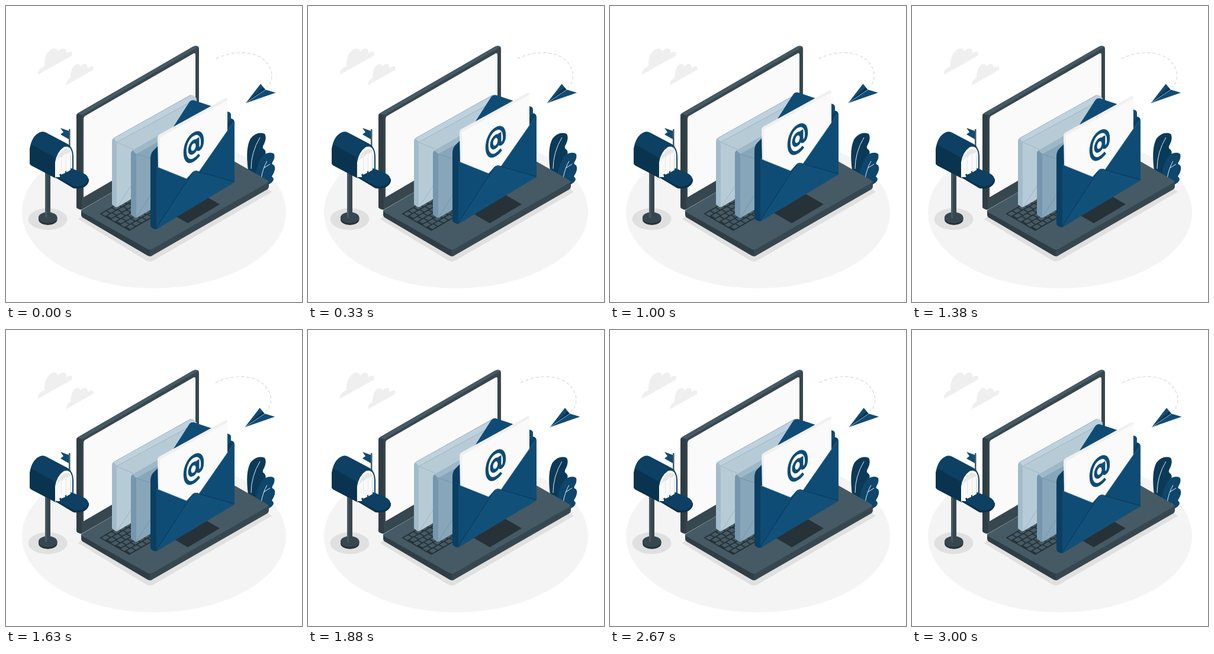
Recreate the animation shown at these times as an HTML page. Size 500 by 500 pixels, loop 3040 ms.

```html
<!DOCTYPE html>
<html lang="en">
<head>
<meta charset="utf-8">
<title>Email</title>
<style>
  html, body { margin: 0; width: 100%; height: 100%; overflow: hidden; background: #fff; }
  svg { display: block; width: 100vw; height: 100vh; }
</style>
</head>
<body>
<svg viewBox="0 0 500 500">
  <ellipse cx="250" cy="348" rx="223" ry="129" fill="#f4f4f4"/>

  <g id="clouds" fill="#efefef">
    <path d="M54 116L111 84Q113 77 109 77Q105 78 102 80Q103 72 97 72Q92 72 88 77Q86 69 77 73Q64 81 65 102Q53 106 54 116Z"/>
    <path d="M101 134L147 108Q149 101 144 102Q140 103 138 105Q138 97 132 98Q128 99 126 102Q123 95 116 100Q109 106 109 121Q101 126 101 134Z"/>
  </g>

  <g id="plant">
    <path d="M409 278Q404 240 413 224Q424 211 437 216Q441 222 436 233Q431 240 437 243Q441 248 435 256L432 288Z" fill="#0b3a59"/>
    <path d="M420 294Q424 262 436 251Q447 245 453 250Q455 256 450 264Q448 267 453 269Q457 276 449 288Q457 294 443 302Z" fill="#0e466c"/>
    <path d="M414 275Q414 247 429 222M431 291Q434 274 441 262M435 274L446 267" fill="none" stroke="#e8eef2" stroke-width="1"/>
  </g>

  <g id="laptop">
    <path d="M122 360L237 430Q243 433 249 430L449 314L430 300L140 345Z" fill="#e0e0e0"/>
    <path d="M127 345V353Q127 355 129 357L238 421Q243 424 243 422V400Z" fill="#2f3d45"/>
    <path d="M243 405V423Q246 423 248 421L441 310Q444 308 444 305V296Z" fill="#37474f"/>
    <path d="M127 345L327 229L441 294Q445 297 441 299L248 410Q243 413 238 410L130 349Q126 347 127 345Z" fill="#455a64"/>
    <path d="M119 187Q119 182 123 180L315 69Q320 66 324 68Q326 69 326 73V230L128 344Q124 344 121 342Q119 341 119 338Z" fill="#37474f"/>
    <path d="M119 187Q119 182 121 182L128 185V344Q124 344 121 342Q119 341 119 338Z" fill="#2f3d45"/>
    <path d="M121 182L316 69Q320 66 325 69L129 184Q125 183 121 182Z" fill="#455a64"/>
    <path d="M131 191Q131 188 133 186L317 80Q320 79 320 82V213L131 323Z" fill="#fafafa"/>
    <path d="M307 367L361 335L330 317L276 349Z" fill="#263238"/>
    <g id="keyboard" transform="matrix(.866 .5 .866 -.5 158 351)">
      <rect width="58" height="110" rx="1" fill="#263238"/>
    </g>
  </g>

  <g id="mailbox">
    <ellipse cx="70.500" cy="360" rx="33" ry="18.500" fill="#e0e0e0"/>
    <path d="M55 357V360.500A15.700 9.500 0 0 0 86.500 360.500V357Z" fill="#263238"/>
    <ellipse cx="70.700" cy="357.500" rx="15.800" ry="9.500" fill="#37474f"/>
    <path d="M66 272H75V357Q70.500 361 66 357Z" fill="#37474f"/>
    <path d="M66 272H69V359L66 357Z" fill="#455a64"/>
    <path d="M106 208H108.500V242H106Z" fill="#455a64"/>
    <path d="M92 206L106 211V225L92 217L97 213Z" fill="#0f4c75"/>
    <path d="M40 265V242Q43 219 58 213Q63 211 68 214L104 233Q114 239 114 256V276L84 291L44 270Q40 268 40 265Z" fill="#0d4063"/>
    <path d="M40 265V242Q41 237 43 234L82 256V290L44 270Q40 268 40 265Z" fill="#0a3350"/>
    <path d="M83 290V264Q86 246 98 238Q112 234 112 256V276Z" fill="#fff"/>
    <path d="M85 289V264Q88 249 98 242Q110 238 110 256V277Z" fill="#e6e6e6"/>
    <path d="M85 289V262L93 254V284ZM94 284V255L101 249V280ZM102 280V250L108 247V277Z" fill="#fafafa"/>
    <path d="M84 290L114 308Q136 310 140 296V292L110 280Z" fill="#09304a"/>
    <path d="M84 288L110 274L130 282Q140 287 139 294Q132 308 114 304Z" fill="#0d4063"/>
    <path d="M85 289V283L91 286V289ZM93 285V278L100 278V282ZM102 281V274L109 273V277Z" fill="#fafafa"/>
  </g>

  <g id="queue" stroke-linejoin="round">
    <path d="M179 229Q179 225 182 223L310 151Q314 149 318 152L322 157V262L191 338Q187 341 184 339L179 335Z" fill="#b7cbd7"/>
    <path d="M179 229Q179 225 182 223L187 230V340L179 335Z" fill="#a3bccb"/>
    <path d="M182 223L310 151Q314 149 322 156L187 230Z" fill="#bfd1dc"/>
    <path d="M182 223L312 150.500M187 230L322 157M187 230L215 242M189 338L215 298" fill="none" stroke="#93b0c2" stroke-width=".8"/>
    <path d="M211 250Q211 246 214 244L284 204L300 214V312L224 356Q219 359 216 356L211 352Z" fill="#87a6ba"/>
    <path d="M211 250Q211 246 214 244L220 250V358L211 352Z" fill="#7596ac"/>
    <path d="M214 244L284 204L290 211L220 250Z" fill="#9fb8c8"/>
    <path d="M220 250L250 260M221 356L252 307" fill="none" stroke="#6f93aa" stroke-width=".9"/>
  </g>

  <g id="envelope" stroke-linejoin="round">
    <path d="M244 370V258Q244 249 249 244L258 235L283 204L310 162Q313 158 319 160L376 179Q380 180 380 185V190Q386 191 386 197V296L256 376Q252 378 249 376Q244 374 244 370Z" fill="#0b3f62"/>
    <path d="M283 204L310 162Q313 158 319 160L376 179Q380 180 380 185V191L374 198L340 176Z" fill="#0f4c75"/>
    <path d="M256 222Q256 219 259 217L370 156Q374 154 374 158V230L310 300L257 276Z" fill="#f0f0f0"/>
    <path d="M260 222L374 159V230L310 300L260 278Z" fill="#fafafa"/>
    <g transform="matrix(.866 -.5 0 1 317 238)" fill="none" stroke="#0f4c75" stroke-width="5.800">
      <ellipse cx="-.5" cy="0" rx="7.500" ry="9"/>
      <path d="M8 -11V4Q8 9 12 9Q17 8 17 -1C17 -14 9 -21.500 0 -21.500C-10 -21.500 -17 -13 -17 0C-17 13 -10 22 0 22Q6 22 11 18.500"/>
    </g>
    <path d="M254 377V271.500L305 292L315 281Q320 277 326 280L385 195Q386 195 386 197V293Q386 296 384 298L257 375Z" fill="#0f4c75"/>
    <path d="M254 376L315 281Q320 277 326 280L386 298L257 375Z" fill="#115179"/>
    <path d="M254 375L315 281Q320 277 326 280L386 297" fill="none" stroke="#0a3656" stroke-width="1"/>
    <path d="M254 271.500L305 292L315 281Q320 277 326 280L385 195" fill="none" stroke="#2c688f" stroke-width=".8"/>
  </g>

  <g id="plane">
    <path d="M355 89C385 74 420 76 437 92C453 108 452 128 440 138" fill="none" stroke="#dedede" stroke-width="1.400" stroke-dasharray="5.500 3.500"/>
    <path d="M405 164L430 131.500L438 141Z" fill="#0f4c75"/>
    <path d="M405 164L434 138L439 142L437 152Z" fill="#0a3350"/>
    <path d="M405 164L439 141.500L455.500 146.500Z" fill="#0f4c75"/>
    <path d="M406 163.300L439 141" stroke="#c4d2dc" stroke-width=".8"/>
  </g>
</svg>
<script>
const LOOP = 3040, CYCLE = 3000, BOB = 1500, LIFT = 20, FPS = 24;
const SHAKE = [0, -2, 4, -8, 8, -8, 8, -8, 4, -2, 0];
const byId = id => document.getElementById(id);

function addKeys() {
  const keyboard = byId('keyboard');
  for (let row = 0; row < 6; row++) {
    for (let col = 0; col < 10; col++) {
      const key = document.createElementNS('http://www.w3.org/2000/svg', 'rect');
      const attrs = { x: 2 + row * 9.3, y: 2 + col * 10.6 + (row % 2) * 2.5, width: 7.3, height: 8.6, rx: 1, fill: '#455a64' };
      for (const name in attrs) key.setAttribute(name, attrs[name]);
      keyboard.append(key);
    }
  }
}

const move = (id, x, y) => byId(id).setAttribute('transform', `translate(${x} ${y})`);

// Linear bob: up for half a period, then down again.
const bob = t => -LIFT * (1 - Math.abs(1 - (t % BOB) / (BOB / 2)));

function shake(t) {
  const pos = t / CYCLE * (SHAKE.length - 1);
  const i = Math.min(Math.floor(pos), SHAKE.length - 2);
  return SHAKE[i] + (SHAKE[i + 1] - SHAKE[i]) * (pos - i);
}

function render(ms) {
  const step = Math.floor((ms % LOOP + 5) * FPS / 1000);
  const t = Math.min(step * 1000 / FPS, CYCLE);
  move('envelope', 0, bob(t));
  move('plane', shake(t), 0);
}

addKeys();
const start = performance.now();
function tick() {
  render(performance.now() - start);
  requestAnimationFrame(tick);
}
tick();
</script>
</body>
</html>
```
